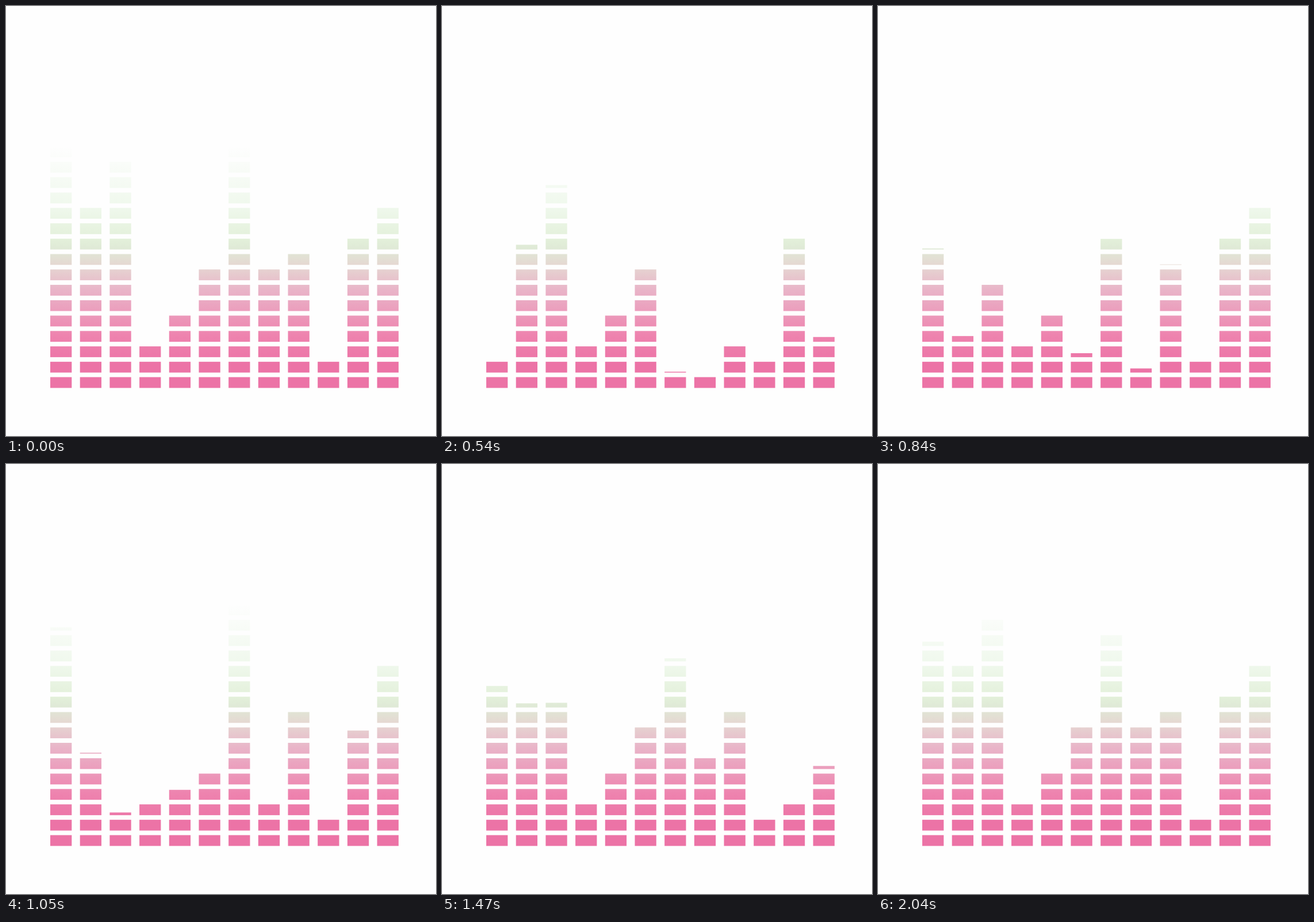
An HTML page with a canvas that plays this animation: 748 px wide and 748 px high, repeating every 2.28 s.

```html
<!DOCTYPE html>
<html>
<head>
<meta charset="utf-8">
<style>
html, body { margin: 0; width: 100%; height: 100%; overflow: hidden; background: #fefefe; }
canvas { display: block; }
</style>
</head>
<body>
<canvas id="stage" width="748" height="748"></canvas>
<script>
const ctx = document.getElementById('stage').getContext('2d');
const LOOP = 2280, STEP = 30, PAPER = '#fefefe';
const LEFT = 77, PITCH_X = 51.69, CELL_W = 37.3;
const LOWEST = 645.6, PITCH_Y = 26.76, CELL_H = 18.8;

// A dip sinks at an even speed from start to turn, then climbs back until end.
const dip = (start, turn, end, depth) => t =>
  depth * Math.max(0, Math.min((t - start) / (turn - start), (end - t) / (end - turn)));
const bar = (cells, ...dips) => ({ cells, dips });

const bars = [
  bar(16, dip(0, 540, 1111, 374), dip(1174, 1735, 2137, 269)),
  bar(12, dip(419, 877, 1335, 242.5), dip(1262, 1770, 2035, 159)),
  bar(15, dip(470, 1079, 1742, 352)),
  bar(3),
  bar(5, dip(960, 1215, 1440, 80)),
  bar(8, dip(555, 870, 1200, 161)),
  bar(16, dip(0, 540, 1049, 392), dip(1290, 1760, 2110, 245)),
  bar(8, dip(135, 600, 1723, 219)),
  bar(9, dip(150, 525, 878, 167), dip(1500, 1725, 2000, 113)),
  bar(2),
  bar(10, dip(930, 1407, 1710, 234)),
  bar(12, dip(135, 510, 840, 247), dip(1250, 1585, 2010, 265))
];

const tint = ctx.createLinearGradient(0, 244, 0, 665);
const shade = (y, color) => tint.addColorStop((y - 244) / 421, color);
shade(244, PAPER);
shade(351, '#eff8ec');
shade(405, '#e3f0da');
shade(423, '#dfe9d6');
shade(450, '#e5d8d2');
shade(494, '#e9b4c8');
shade(575, '#ee82ae');
shade(622, '#ec73a6');

const cellTop = row => LOWEST - row * PITCH_Y;

function drawBar({ cells, dips }, x, t) {
  const sink = Math.max(0, ...dips.map(depthAt => depthAt(t)));
  const top = Math.min(LOWEST, cellTop(cells - 1) + sink);
  for (let row = 0; row < cells; row++) {
    const y = Math.max(cellTop(row), top);
    const h = cellTop(row) + CELL_H - y;
    if (h > 0) ctx.fillRect(x, y, CELL_W, h);
  }
}

function draw(t) {
  ctx.fillStyle = PAPER;
  ctx.fillRect(0, 0, 748, 748);
  ctx.fillStyle = tint;
  bars.forEach((b, i) => drawBar(b, LEFT + i * PITCH_X, t));
}

const start = performance.now();
function tick() {
  const t = (performance.now() - start) % LOOP;
  draw(Math.floor(t / STEP) * STEP);
  requestAnimationFrame(tick);
}
tick();
</script>
</body>
</html>
```
